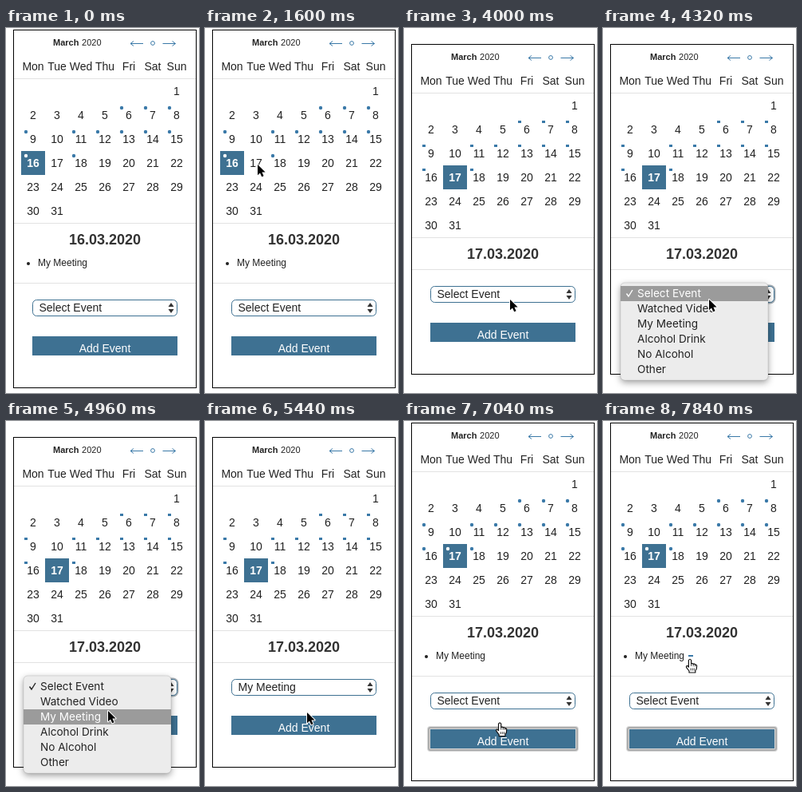
An HTML page with a canvas that plays this animation: 242x457 px, repeating every 8000 ms.

```html
<!DOCTYPE html>
<html lang="en">
<head>
<meta charset="utf-8">
<title>Calendar</title>
<style>
html, body { margin: 0; width: 100%; height: 100%; overflow: hidden; background: #fff; }
canvas { display: block; width: 242px; height: 457px; }
</style>
</head>
<body>
<canvas id="stage"></canvas>
<script>
const W = 242, H = 457, LOOP = 8000, STEP = 160;
const BLUE = '#3e7192', LINE = '#e2e2e2', INK = '#222', DOT = '#3a79a8';
const SANS = '"Liberation Sans", Arial, sans-serif';
const MENU = 'Inter, "Open Sans", sans-serif';
const DAYS = ['Mon', 'Tue', 'Wed', 'Thu', 'Fri', 'Sat', 'Sun'];
const EVENT = 'My Meeting';
const ITEMS = ['Select Event', 'Watched Video', EVENT, 'Alcohol Drink', 'No Alcohol', 'Other'];
const MARKED = [6, 7, 8, 9, 11, 12, 13, 14, 15, 16, 18];

// Pointer stops: time, x, y
const PATH = [
  [640, 160, 316], [800, 160, 316], [1600, 66, 171], [1920, 65, 171],
  [3200, 65, 171], [4000, 133, 340], [4480, 133, 340], [4960, 128, 363],
  [5440, 128, 365], [5920, 121, 384], [6880, 121, 384], [7840, 109, 298]
];

const canvas = document.getElementById('stage');
const ctx = canvas.getContext('2d');
const scale = window.devicePixelRatio || 1;
canvas.width = W * scale;
canvas.height = H * scale;

const within = (t, a, b) => t >= a && t < b;

function text(s, x, y, size, { color = INK, bold = false, align = 'left', family = SANS } = {}) {
  ctx.font = `${bold ? 'bold ' : ''}${size}px ${family}`;
  ctx.textAlign = align;
  ctx.fillStyle = color;
  ctx.fillText(s, x, y);
}

function box(x, y, w, h, color) {
  ctx.fillStyle = color;
  ctx.fillRect(x, y, w, h);
}

function round(x, y, w, h, r) {
  ctx.beginPath();
  ctx.roundRect(x, y, w, h, r);
}

function disc(x, y, r, color) {
  ctx.beginPath();
  ctx.arc(x, y, r, 0, Math.PI * 2);
  ctx.fillStyle = color;
  ctx.fill();
}

function poly(points, color) {
  ctx.beginPath();
  points.forEach(([x, y]) => ctx.lineTo(x, y));
  ctx.closePath();
  ctx.fillStyle = color;
  ctx.fill();
}

function navArrow(x, y, dir) {
  ctx.beginPath();
  ctx.moveTo(x, y);
  ctx.lineTo(x - dir * 16, y);
  ctx.moveTo(x - dir * 4, y - 3);
  ctx.lineTo(x, y);
  ctx.lineTo(x - dir * 4, y + 3);
  ctx.stroke();
}

function header(y) {
  text('March', 59, y + 22, 11, { bold: true });
  text('2020', 119.5, y + 22, 11, { align: 'right' });
  ctx.strokeStyle = DOT;
  ctx.lineWidth = 1;
  navArrow(156, y + 19.5, -1);
  navArrow(212.5, y + 19.5, 1);
  ctx.beginPath();
  ctx.arc(184, y + 19, 2.4, 0, Math.PI * 2);
  ctx.stroke();
  DAYS.forEach((d, i) => text(d, 34 + 30 * i, y + 53, 14, { align: 'center' }));
  box(10, y + 63, 228, 1, LINE);
}

function mark(x, y, short, color) {
  if (short) box(x - 2, y - 1, 4, 3, color);
  else disc(x, y, 2.2, color);
}

function days(y, { selected, hover, marked, short }) {
  for (let d = 1; d <= 31; d++) {
    const slot = d + 5;
    const cx = 34 + 30 * (slot % 7);
    const cy = y + 79 + 30 * Math.floor(slot / 7);
    const on = d === selected, over = d === hover;
    if (on || over) box(cx - 15, cy - 15, 30, 30, on ? BLUE : '#f1f3f5');
    text(d, cx, cy + 5, 14, { bold: on, align: 'center', color: on ? '#fff' : over ? DOT : INK });
    if (marked.includes(d)) mark(cx - 9, cy + 20 - 29 + (short ? -1 : 0), short, on ? '#fff' : DOT);
  }
  box(10, y + 244, 228, 1, LINE);
}

function select(y, label, focused) {
  round(33.5, y + 0.5, 181, 20, 5);
  if (focused) {
    ctx.strokeStyle = '#aab2b8';
    ctx.lineWidth = 4;
    ctx.stroke();
  }
  ctx.fillStyle = '#fff';
  ctx.fill();
  ctx.strokeStyle = BLUE;
  ctx.lineWidth = 1;
  ctx.stroke();
  text(label, 41.5, y + 15, 14);
  poly([[203.5, y + 9], [207, y + 4], [210.5, y + 9]], '#333');
  poly([[203.5, y + 12], [207, y + 17], [210.5, y + 12]], '#333');
}

function button(y, focused) {
  if (focused) {
    round(31, y - 2, 186, 28, 2);
    ctx.strokeStyle = '#d9d9d9';
    ctx.lineWidth = 4;
    ctx.stroke();
    ctx.strokeStyle = '#adadad';
    ctx.lineWidth = 2;
    ctx.stroke();
  }
  box(33, y, 182, 24, BLUE);
  text('Add Event', 124, y + 20, 14, { color: '#fff', align: 'center' });
}

function menu(active) {
  ctx.save();
  ctx.shadowColor = 'rgba(0,0,0,.38)';
  ctx.shadowBlur = 9 * scale;
  ctx.shadowOffsetY = 3 * scale;
  round(22, 319, 185, 122, 5);
  ctx.fillStyle = '#ececec';
  ctx.fill();
  ctx.restore();
  round(22, 319, 185, 122, 5);
  ctx.strokeStyle = 'rgba(0,0,0,.18)';
  ctx.lineWidth = 0.6;
  ctx.stroke();
  box(22, 323 + 19 * active, 185, 19, '#9b9b9b');
  ITEMS.forEach((s, i) => text(s, 43, 337 + 19 * i, 13.6,
    { family: MENU, color: i === active ? '#fff' : INK }));
  ctx.beginPath();
  ctx.moveTo(29.5, 332.5);
  ctx.lineTo(32, 336);
  ctx.lineTo(37, 328);
  ctx.strokeStyle = active === 0 ? '#fff' : INK;
  ctx.lineWidth = 1.4;
  ctx.stroke();
}

const ARROW = new Path2D('M0 0V13.2L3 10.4L5.2 15.3L7.6 14.3L5.4 9.5H9.6Z');
const HAND = new Path2D('M-1.6 1.5Q0-1 1.6 1.5V6Q3.2 4.8 4.2 6.4Q5.8 5.4 6.6 7.2Q8.6 6.6 8.6 9' +
  'L8.2 12.5L6.8 14.5V17H-1V15L-4.4 10.6Q-5 8-3 8.6L-1.6 10Z');
const FINGERS = new Path2D('M1.6 6V9M4.2 6.4V9.2M6.6 7.2V9.4M1 11.5V14.5M3.2 11.5V14.5M5.3 11.5V14.5');

function pointer(x, y, hand, ring) {
  ctx.save();
  ctx.translate(x, y);
  if (ring) {
    disc(2, 8, 17, 'rgba(255,255,255,.4)');
    ctx.beginPath();
    ctx.arc(2, 8, 16, 0, Math.PI * 2);
    ctx.strokeStyle = '#111';
    ctx.lineWidth = 1.2;
    ctx.stroke();
  }
  ctx.lineJoin = 'round';
  if (hand) {
    ctx.fillStyle = '#fff';
    ctx.fill(HAND);
    ctx.strokeStyle = '#111';
    ctx.lineWidth = 1.2;
    ctx.stroke(HAND);
    ctx.lineWidth = 0.8;
    ctx.stroke(FINGERS);
  } else {
    ctx.strokeStyle = '#fff';
    ctx.lineWidth = 2;
    ctx.stroke(ARROW);
    ctx.fillStyle = '#000';
    ctx.fill(ARROW);
  }
  ctx.restore();
}

function pointerAt(t) {
  const i = PATH.findIndex(p => p[0] > t);
  if (i < 0) return PATH[PATH.length - 1].slice(1);
  const [t0, x0, y0] = PATH[i - 1], [t1, x1, y1] = PATH[i];
  const u = (t - t0) / (t1 - t0), e = u * u * (3 - 2 * u);
  return [x0 + (x1 - x0) * e, y0 + (y1 - y0) * e];
}

function draw(t) {
  const empty = within(t, 3200, 6400);
  const added = t >= 6400;
  const top = empty ? 18 : 0;
  const formY = empty ? 323 : 340;
  const open = within(t, 4320, 5440);
  const selected = t < 3200 ? 16 : 17;

  ctx.setTransform(scale, 0, 0, scale, 0, 0);
  box(0, 0, W, H, '#fff');
  ctx.strokeStyle = '#000';
  ctx.lineWidth = 1;
  ctx.strokeRect(9.5, top + 2.5, 229, empty ? 413 : 448);

  header(top);
  days(top, {
    selected,
    hover: within(t, 1920, 3200) ? 17 : 0,
    marked: added ? [...MARKED, 17] : MARKED,
    short: empty
  });
  text(`${selected}.03.2020`, 124, top + 271, 18, { bold: true, align: 'center', color: '#333' });
  if (!empty) {
    disc(28, 295, 2, INK);
    text(EVENT, 40, 298, 12);
  }
  if (t >= 7680) box(107, 293, 6, 2, DOT);
  box(10, formY - 21, 228, 1, LINE);
  select(formY, within(t, 5440, 6400) ? EVENT : ITEMS[0], open);
  button(formY + 46, t >= 6080);

  if (t < 640) return;
  const [x, y] = pointerAt(t);
  if (open) menu(Math.max(0, Math.min(5, Math.floor((y - 323) / 19))));
  const hand = within(t, 1920, 3520) || within(t, 5760, 7200) || t >= 7680;
  const ring = within(t, 2880, 3200) || within(t, 4160, 4320) ||
    within(t, 5280, 5440) || within(t, 6080, 6400);
  pointer(x, y, hand, ring);
}

const start = performance.now();
function tick() {
  const t = (performance.now() - start) % LOOP;
  draw(Math.floor(t / STEP) * STEP);
  requestAnimationFrame(tick);
}
tick();
</script>
</body>
</html>
```
